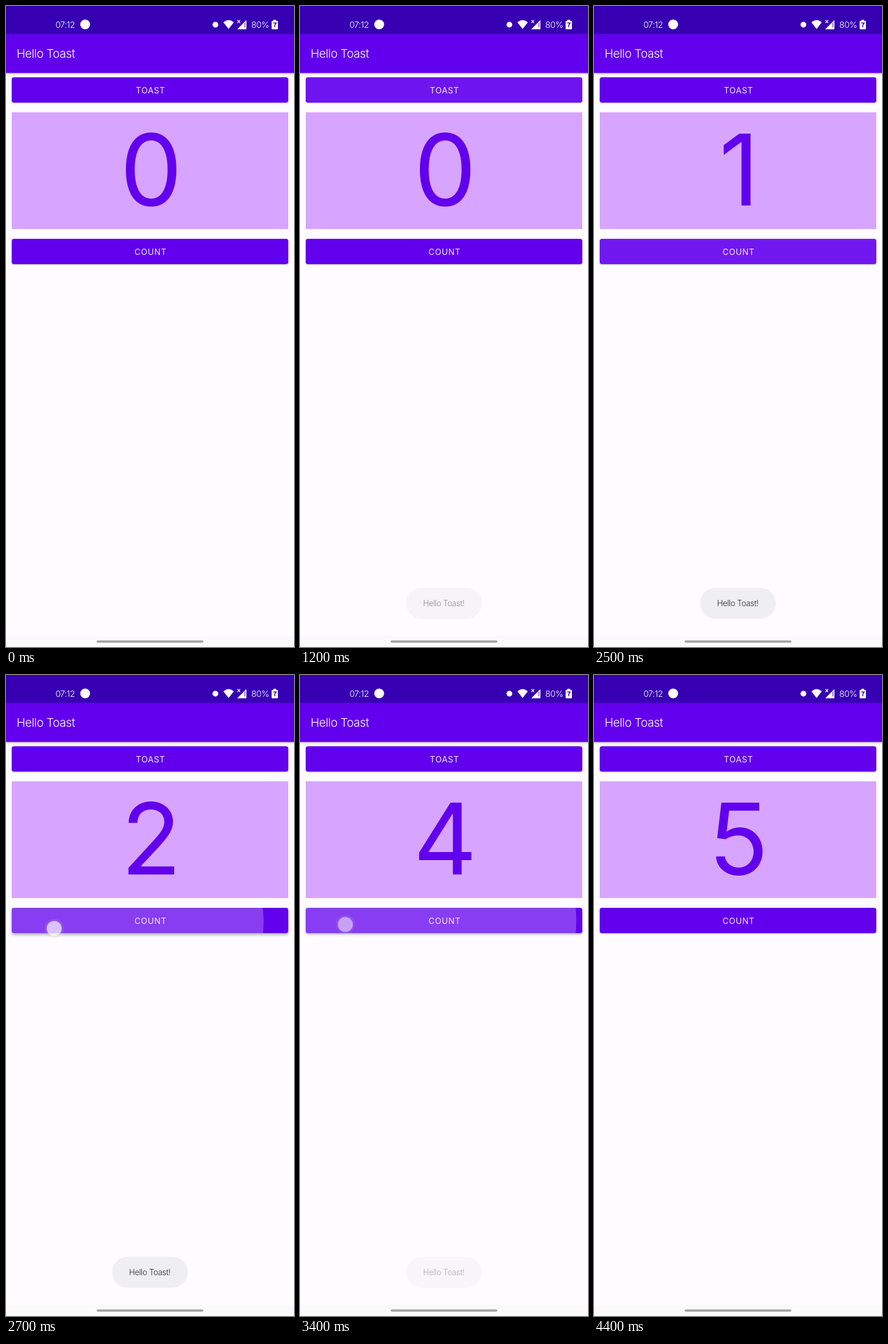
An HTML page for the animation above (4.9 s loop, 502 px wide and 1115 px high).

```html
<!DOCTYPE html>
<html lang="en">
<head>
<meta charset="utf-8">
<title>Hello Toast</title>
<style>
  html, body { margin: 0; width: 100%; height: 100%; overflow: hidden; background: #fefcff; }
  svg { display: block; width: 100%; height: 100%; }
  text { font-family: Inter, "Liberation Sans", sans-serif; fill: #fff; }
  .light { font-weight: 300; }
  .mid { text-anchor: middle; }
  .label { font-size: 14.4px; letter-spacing: .7px; fill: #f3eafe; }
  .status { font-size: 15px; letter-spacing: -.5px; }
  .title { font-size: 20.5px; letter-spacing: -.42px; }
  .count { font-size: 172px; fill: #6200ee; }
  .note { font-size: 14px; letter-spacing: -.37px; fill: #2c2a2e; }
  .bar { filter: drop-shadow(0 1px 2px rgba(0, 0, 0, .3)); }
  .dot { filter: drop-shadow(0 0 1.5px rgba(60, 40, 90, .35)); }
</style>
</head>
<body>
<svg viewBox="0 0 502 1115" xmlns="http://www.w3.org/2000/svg">
  <defs>
    <clipPath id="clip0"><rect x="10" y="124" width="482" height="44" rx="4"/></clipPath>
    <clipPath id="clip1"><rect x="10" y="405" width="482" height="44" rx="4"/></clipPath>
    <radialGradient id="halo">
      <stop offset=".65" stop-color="#fff" stop-opacity=".35"/>
      <stop offset="1" stop-color="#fff" stop-opacity="0"/>
    </radialGradient>
  </defs>

  <rect width="502" height="1115" fill="#fefcff"/>
  <rect y="1095" width="502" height="20" fill="#fafafa"/>
  <rect x="158" y="1103.5" width="186" height="4" rx="2" fill="#a5a3a5"/>

  <rect class="bar" y="40" width="502" height="76.5" fill="#6200ee"/>
  <rect width="502" height="48.5" fill="#3700b3"/>
  <text class="title light" x="18.5" y="90">Hello Toast</text>

  <!-- status bar -->
  <text class="status light mid" x="103" y="38">07:12</text>
  <text class="status light mid" x="443" y="38">80%</text>
  <g fill="#fff">
    <circle cx="138" cy="32" r="8.6"/>
    <circle cx="365" cy="32.5" r="5"/>
    <path d="M379 28.5Q388 20.5 397 28.5L388 40Z"/>
    <path d="M403 40.5L419 24.5V40.5Z"/>
    <path d="M466 24h5v2h2a1 1 0 0 1 1 1v12.500a1 1 0 0 1-1 1h-9a1 1 0 0 1-1-1V27a1 1 0 0 1 1-1h2z"/>
  </g>
  <path d="M403.500 24.500l4.500 5m0-5l-4.500 5" stroke="#fff" stroke-width="1.200"/>
  <path d="M416.500 29v8" stroke="#3700b3" stroke-width="1"/>
  <path d="M466 29.500h5l-2.500 3.500v4" fill="none" stroke="#3700b3" stroke-width="1.500"/>

  <!-- counter and buttons -->
  <rect x="10" y="185" width="482" height="203" fill="#d7a5ff"/>
  <text id="count" class="count mid" x="253" y="347">0</text>

  <rect class="button" x="10" y="124" width="482" height="44" rx="4" fill="#6200ee"/>
  <g id="ripples0" clip-path="url(#clip0)"></g>
  <text class="label mid" x="252" y="151.500">TOAST</text>

  <rect class="button" x="10" y="405" width="482" height="44" rx="4" fill="#6200ee"/>
  <g id="ripples1" clip-path="url(#clip1)"></g>
  <text class="label mid" x="252" y="432.500">COUNT</text>

  <g id="toast" opacity="0">
    <rect x="185" y="1012" width="132" height="54" rx="27" fill="#efeef0"/>
    <text class="note light mid" x="250.500" y="1044">Hello Toast!</text>
  </g>
  <g id="dots"></g>
</svg>

<script>
const LOOP = 4900, STEP = 100;
const CENTER_X = 251, START_R = 145, FULL_R = 243;
const ENTER = 225, EXIT = 150, RELEASE = 65;

// button: 0 = toast, 1 = count
const taps = [
  { button: 0, x: 92, y: 148, at: 875 },
  { button: 1, x: 90, y: 428, at: 2185 },
  { button: 1, x: 84, y: 441, at: 2624 },
  { button: 1, x: 77, y: 437, at: 3004 },
  { button: 1, x: 79, y: 434, at: 3285 },
  { button: 1, x: 80, y: 432, at: 3540 }
];
const centerY = [146, 427];

const $ = id => document.getElementById(id);
const buttons = document.querySelectorAll('.button');
const clamp = v => Math.max(0, Math.min(1, v));
const mix = (a, b, k) => a + (b - a) * k;

function add(parent, tag, attrs) {
  const el = document.createElementNS('http://www.w3.org/2000/svg', tag);
  set(el, attrs);
  return parent.appendChild(el);
}
function set(el, attrs) {
  for (const key in attrs) el.setAttribute(key, attrs[key]);
}

for (const tap of taps) {
  tap.ripple = add($('ripples' + tap.button), 'circle', { fill: '#fff' });
  tap.dot = add($('dots'), 'g', { class: 'dot' });
  const pos = { cx: tap.x, cy: tap.y };
  add(tap.dot, 'circle', { ...pos, r: 18, fill: 'url(#halo)' });
  add(tap.dot, 'circle', { ...pos, r: 13, fill: '#fff' });
}

function drawTap(tap, age) {
  const k = 1 - Math.pow(1 - clamp(age / ENTER), 4.3);
  const fade = clamp(age / 75) * clamp(1 - (age - ENTER) / EXIT);
  set(tap.ripple, {
    cx: mix(tap.x, CENTER_X, k),
    cy: mix(tap.y, centerY[tap.button], k),
    r: mix(START_R, FULL_R, k),
    opacity: 0.24 * fade
  });
  set(tap.dot, { opacity: age < 0 ? 0 : 0.7 * clamp(1 - (age - 75) / 155) });
}

function draw(t) {
  const lift = [0, 0];
  let count = 0;
  for (const tap of taps) {
    const age = t - tap.at;
    drawTap(tap, age);
    lift[tap.button] += clamp(Math.min(age / 70, (170 - age) / 70));
    if (tap.button === 1 && age >= RELEASE) count++;
  }
  buttons.forEach((el, i) => {
    const y = mix(1, 3, lift[i]), blur = mix(1.2, 2.6, lift[i]);
    el.style.filter = `drop-shadow(0 ${y}px ${blur}px rgba(0, 0, 0, .3))`;
  });
  $('count').textContent = count;

  const shown = 1 - Math.pow(1 - clamp((t - 1060) / 450), 2);
  set($('toast'), { opacity: shown * clamp(1 - (t - 3180) / 350) });
}

const start = performance.now();
function tick() {
  const t = (performance.now() - start) % LOOP;
  draw(Math.floor(t / STEP) * STEP);
  requestAnimationFrame(tick);
}
tick();
</script>
</body>
</html>
```
